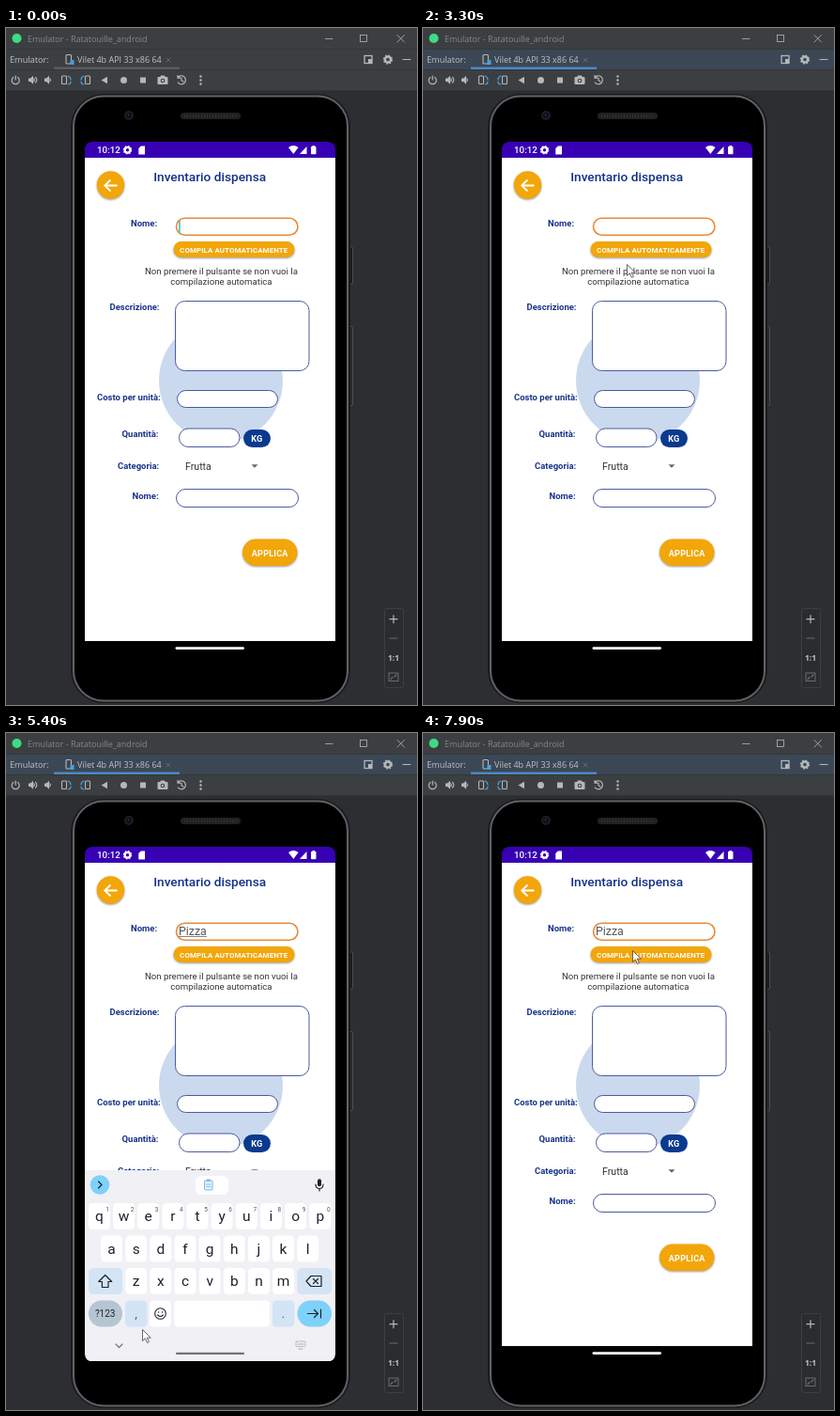
An HTML page for the animation above (8000 ms loop, 438 by 720 pixels).

```html
<!DOCTYPE html>
<html lang="it">
<head>
<meta charset="utf-8">
<title>Inventario dispensa</title>
<style>
html, body { margin: 0; width: 438px; height: 720px; overflow: hidden; background: #2d2e32; }
svg { display: block; }
text { white-space: pre; }
.ide { font: 9px "Open Sans", "Noto Sans", sans-serif; fill: #bfc2c4; }
.app { font-family: Roboto, "Noto Sans", sans-serif; }
.label { font-size: 9.5px; font-weight: 700; fill: #17348a; }
.field { fill: #fff; stroke: #4b5a9e; stroke-width: 1; }
.btn { fill: #f2a609; filter: drop-shadow(0 1.5px 1.2px #0006); }
.cap { fill: #fff; font-weight: 700; text-anchor: middle; }
.ln { fill: none; stroke-width: 1.2; stroke-linecap: round; stroke-linejoin: round; }
.thin { stroke-width: .8; }
</style>
</head>
<body>
<svg id="stage" width="438" height="720" viewBox="0 0 438 720"></svg>
<script>
const LOOP = 8000, STEP = 100;
const GREY = '#b4b8bb', BLUE = '#4a9fe0', INK = '#1d2329';

const rect = (x, y, w, h, r, fill, extra = '') =>
  `<rect x="${x}" y="${y}" width="${w}" height="${h}" rx="${r}" fill="${fill}" ${extra}/>`;
const dot = (x, y, r, fill, extra = '') =>
  `<circle cx="${x}" cy="${y}" r="${r}" fill="${fill}" ${extra}/>`;
const fill = (d, color, extra = '') => `<path d="${d}" fill="${color}" ${extra}/>`;
const line = (d, color, thin = '') => `<path class="ln ${thin}" d="${d}" stroke="${color}"/>`;
const text = (x, y, s, extra = '') => `<text x="${x}" y="${y}" ${extra}>${s}</text>`;
const field = (x, y, w, h, r, extra = '') =>
  `<rect class="field" x="${x}" y="${y}" width="${w}" height="${h}" rx="${r}" ${extra}/>`;
const button = (x, y, w, h) =>
  `<rect class="btn" x="${x}" y="${y}" width="${w}" height="${h}" rx="${h / 2}"/>`;

function gear(x, y, r, color) {
  return dot(x, y, r * .62, 'none', `stroke="${color}" stroke-width="${r * .5}"`) +
    dot(x, y, r * .88, 'none',
      `stroke="${color}" stroke-width="${r * .3}" stroke-dasharray="${r * .345}"`);
}

function speaker(x, waves) {
  let s = fill(`M${x - 4} 53.5h2l3-2.8v9l-3-2.8h-2z`, GREY);
  for (let i = 1; i <= waves; i++)
    s += line(`M${x + i * 1.7} ${55.2 - i * 1.4}q${i * 1.4} ${i * 1.4} 0 ${i * 2.8}`, GREY);
  return s;
}

function rotateIcon(x, side) {
  return rect(x - 2.5 + side * 2, 51, 5, 8.5, 1, 'none', `stroke="${GREY}" stroke-width="1.1"`) +
    line(`M${x - side * 2} 51q${-side * 3} 1 ${-side * 3} 4M${x - side * 2} 60q${-side * 3} 0 ${-side * 3} -3`, BLUE);
}

function ide() {
  return rect(0, 0, 438, 67, 0, '#3c3f41') +
    rect(0, 23, 438, 21, 0, '#3c3f41', 'id="header"') +
    rect(0, 22, 438, 1, 0, '#343739') + rect(0, 44, 438, 1, 0, '#333638') +
    rect(0, 66, 438, 1, 0, '#323436') +
    dot(11.5, 11, 5, '#3ddc84') +
    `<g class="ide">` +
    text(23, 15, 'Emulator - Ratatouille_android', 'fill="#85888b"') +
    text(4, 37, 'Emulator:', 'font-size="9.2"') +
    text(76, 37, 'Vilet 4b API 33 x86 64') + `</g>` +
    line('M340.5 11.5h7.5M417 7.5l7.5 7.5M424.5 7.5l-7.5 7.5', GREY, 'thin') +
    rect(377.5, 7.5, 7, 7, 0, 'none', `stroke="${GREY}" stroke-width=".8"`) +
    rect(64, 28.5, 5.5, 9.5, 1, 'none', `stroke="${GREY}" stroke-width="1.1"`) +
    rect(68.5, 34, 4, 5, .5, BLUE) +
    line('M171 32l4 4M175 32l-4 4', '#6e7275', 'thin') +
    rect(51, 41.5, 134, 2.5, 0, '#595d61', 'id="tab"') +
    rect(382, 29.5, 8, 8, 0, 'none', `stroke="${GREY}" stroke-width="1.3"`) +
    rect(386, 33, 4, 4.5, 0, GREY) +
    gear(407, 33.5, 5, GREY) + line('M423 33.5h8', GREY) +
    line('M7.8 52.5a4 4 0 1 0 4.8 0M10.2 51v4', GREY) +
    speaker(28, 2) + speaker(45, 1) + rotateIcon(64, -1) + rotateIcon(85, 1) +
    fill('M101.5 55.5l6.5-3.7v7.4z', GREY) + dot(125.5, 55.5, 3.5, GREY) +
    rect(143, 52.5, 6, 6, 0, GREY) +
    rect(161.5, 52, 11, 8, 1, GREY) + rect(164.5, 50.5, 5, 3, 1, GREY) +
    dot(167, 56, 2.3, '#3c3f41') + dot(167, 56, 1.2, GREY) +
    line('M183 53a4.5 4.5 0 1 1 .3 5M183 50.5v2.7h2.7M187 53v2.7l2 1.2', GREY) +
    [51.5, 55.5, 59.5].map(y => dot(207.5, y, 1.2, GREY)).join('');
}

function zoomPanel() {
  return rect(403.5, 617.5, 20, 84, 2, '#2b2c2f', 'stroke="#3c3f42"') +
    line('M409 628.7h8M413 624.7v8', GREY) + line('M409 649h8', '#6a6d70') +
    text(413, 673, '1:1', 'class="ide" text-anchor="middle" style="font-size:8.5px;font-weight:700"') +
    rect(408, 686, 10, 8.5, 0, 'none', 'stroke="#6a6d70"') +
    line('M410 692.5l2-2M414 690l2-2', '#6a6d70');
}

function phone() {
  const side = 'stroke="#55575a" stroke-width=".8"';
  return rect(366, 233, 3.5, 39, 1, '#1b1c1e', side) + rect(366, 317.5, 3.5, 84, 1, '#2a2b2d', side) +
    rect(69, 70, 298, 648, 35, '#1a1b1d') +
    rect(72, 72.5, 292, 643, 32, '#000', 'stroke="#606266" stroke-width="2"') +
    dot(131, 93, 5, '#1c1d20') + dot(131, 93, 2.8, '#0b0d19') + dot(130.5, 92.5, 1, '#2d3354') +
    rect(186, 90, 64, 7, 3.5, '#202123') +
    `<path d="M190 93.5h56" stroke="#35363a" stroke-width="2.5" stroke-dasharray="1 2"/>`;
}

function statusBar() {
  return rect(84, 121, 267, 17, 0, '#3700b3') +
    text(97, 133.3, '10:12', 'font-size="9.8" font-weight="500" fill="#fff"') +
    gear(129.5, 129.8, 4.6, '#fff') +
    fill('M141.3 128l2.5-2.5h4.2v9h-6.7z', '#fff') +
    fill('M301 127q5.3-4 10.6 0l-5.3 7z', '#fff') +
    fill('M313 134l7.5-8v8z', '#fff') +
    rect(325, 126, 5.5, 8.3, .8, '#fff') + rect(326.5, 125, 2.5, 2, 0, '#fff');
}

function form() {
  const labels = [[133, 211, 'Nome:'], [110.5, 299.5, 'Descrizione:'], [97, 395.5, 'Costo per unità:'],
    [123.5, 435, 'Quantità:'], [119, 469.3, 'Categoria:'], [134.5, 500.5, 'Nome:']];
  return rect(84, 138, 267, 514, 0, '#fff') +
    dot(229, 375, 66, '#cbd9ee') +
    `<circle class="btn" cx="111.5" cy="167" r="14.7"/>` +
    `<path d="M118.5 167.5h-13M111.5 161.5l-6.3 6 6.3 6" fill="none" stroke="#fff" stroke-width="1.8"/>` +
    text(217.2, 163.3, 'Inventario dispensa', 'text-anchor="middle" font-size="13.7" font-weight="500" fill="#12308a"') +
    labels.map(([x, y, s]) => text(x, y, s, 'class="label"')).join('') +
    field(181.5, 202.2, 129.5, 18, 9, 'style="stroke:#e8893a;stroke-width:1.6"') +
    button(178.5, 227, 129, 17) +
    text(242.7, 238.9, 'COMPILA AUTOMATICAMENTE', 'class="cap" font-size="7.9" letter-spacing=".1"') +
    `<g font-size="9.65" fill="#333" text-anchor="middle">` +
    text(229.4, 262, 'Non premere il pulsante se non vuoi la') +
    text(229.4, 273, 'compilazione automatica') + `</g>` +
    field(180.5, 290.5, 142.5, 74, 10) +
    field(182.5, 385.5, 107, 18, 9) +
    field(184.5, 426, 64.5, 19.5, 9.7) +
    rect(253, 427, 29, 19, 9.5, '#0a3a8f') +
    text(267.3, 440, 'KG', 'class="cap" font-size="9.2"') +
    text(191, 470.2, 'Frutta', 'font-size="10.6" fill="#333"') +
    fill('M261.5 464.3h7l-3.5 3.5z', '#666') +
    field(181.5, 490.5, 130, 19, 9.5) +
    button(252, 543.5, 58.5, 28.5) +
    text(281.2, 561.8, 'APPLICA', 'class="cap" font-size="9.1" letter-spacing=".2"') +
    text(184, 214.7, '', 'id="typed" font-size="12.4" fill="#555"') +
    rect(184, 216, 0, .8, 0, '#666', 'id="under"') +
    rect(184, 205, 1.8, 13, 0, '#5cc3cf', 'id="caret"');
}

function keyRow(keys, x, y, digits) {
  return [...keys].map((k, i) => {
    const cx = x + i * 26.15;
    return rect(cx - 11.5, y, 23, 28, 4.5, '#fff') +
      text(cx, y + 19, k, 'text-anchor="middle" font-size="15.5"') +
      (digits ? text(cx + 9, y + 8.5, (i + 1) % 10, 'text-anchor="middle" font-size="6.5" fill="#555"') : '');
  }).join('');
}

function keyboard() {
  const pale = '#d3e4f5', sky = '#7fd1fa', clip = '#7db8e8';
  return `<g id="keys" fill="${INK}">` + rect(84, 465, 267, 203, 0, '#f0f0f5') +
    dot(100, 480.5, 10.3, sky) + line('M98.5 477l3.5 3.5-3.5 3.5', INK) +
    rect(202, 471, 35, 20, 6, '#fff') +
    rect(211.5, 476, 8.5, 10, 1, '#e3f1fd', `stroke="${clip}"`) +
    rect(213.5, 474.5, 4.5, 2.5, 1, clip) +
    line('M213.5 480h4.5M213.5 482.5h4.5', clip, 'thin') +
    rect(332, 474.3, 4, 8, 2, INK) + line('M330 480q0 4.5 4 4.5t4-4.5M334 484.5v2.5', INK) +
    keyRow('qwertyuiop', 99.4, 500, true) + keyRow('asdfghjkl', 112.5, 534.5) +
    keyRow('zxcvbnm', 138.7, 569) +
    rect(88, 569, 36, 28, 5, pale) + line('M105.7 576.5l-7 7h3.7v6h6.6v-6h3.7z', INK) +
    rect(310.5, 569, 36.5, 28, 5, pale) +
    line('M325 577.5h11v11h-11l-5-5.5zM327.5 580.5l5 5M332.5 580.5l-5 5', INK) +
    rect(88, 603.5, 36, 28, 14, '#b5c5d2') +
    text(105.7, 621.3, '?123', 'text-anchor="middle" font-size="10"') +
    rect(127, 603.5, 23.5, 28, 4.5, pale) + text(138.5, 622, ',', 'text-anchor="middle" font-size="13" fill="#555"') +
    rect(153, 603.5, 23, 28, 4.5, '#fff') +
    dot(164.5, 617.5, 5.8, 'none', `stroke="${INK}" stroke-width="1.1"`) +
    dot(162.5, 616, .8, INK) + dot(166.5, 616, .8, INK) + line('M161.7 619q2.8 3 5.6 0', INK) +
    rect(179, 603.5, 102, 28, 4.5, '#fff') +
    rect(284, 603.5, 23.5, 28, 4.5, pale) + text(295.5, 622, '.', 'text-anchor="middle" font-size="13" fill="#555"') +
    rect(310.5, 603.5, 36.5, 28, 14, sky) +
    line('M321.5 617.5h11M328.5 613.5l4 4-4 4M335.5 613v9', INK) +
    rect(89.5, 636, 62, 32, 14, '#d2d2d6', 'id="ripple"') +
    line('M117 650l3.5 3.5 3.5-3.5', '#77777b') +
    rect(309, 647, 10, 5.5, .5, 'none', 'stroke="#9a9a9e" stroke-width=".9" stroke-dasharray="1.5 .8"') +
    line('M311 650h6M312 655h4', '#9a9a9e', 'thin') +
    rect(181, 658.7, 73, 2.4, 1.2, '#737377', 'id="pill"') + `</g>`;
}

const $ = id => document.getElementById(id);
$('stage').innerHTML =
  `<clipPath id="screen"><rect x="84" y="121" width="267" height="547.5" rx="8"/></clipPath>` +
  ide() + zoomPanel() + phone() +
  `<g class="app" clip-path="url(#screen)">` + statusBar() + form() +
  rect(84, 652, 267, 17, 0, '#000') + rect(180.5, 658.2, 73.5, 2.8, 1.4, '#fff') +
  keyboard() + `</g>` +
  fill('M.5 .5v12l2.9-2.7 2 4.7 2-.9-2-4.5h3.9z', '#fffd', 'id="mouse" stroke="#444" stroke-width=".8" stroke-linejoin="round"');

// time, x, y
const path = [[2000, 440, 520], [2400, 330, 440], [2700, 285, 405], [3200, 217, 251], [4500, 217, 251],
  [5300, 145, 634], [5400, 145, 634], [5800, 126, 651], [6150, 126, 651], [6400, 164, 518],
  [6900, 188, 390], [7700, 223, 231]];
// time, letters shown
const typing = [[0, 0], [3700, 1], [3900, 2], [4100, 3], [4300, 4], [4600, 5]];
// times at which the caret lights up anew
const blinks = [-300, 3700, 3900, 4100, 4300, 4600, 6200];

const clamp = v => Math.min(1, Math.max(0, v));
const smooth = v => v * v * (3 - 2 * v);
const span = (t, a, b) => smooth(clamp((t - a) / (b - a)));
const set = (id, attrs) => { for (const k in attrs) $(id).setAttribute(k, attrs[k]); };

function mouseAt(t) {
  const i = path.findIndex(p => p[0] > t);
  if (i < 0) return path[path.length - 1].slice(1);
  const [a, b] = [path[Math.max(0, i - 1)], path[i]];
  const k = span(t, a[0], b[0]);
  return [a[1] + (b[1] - a[1]) * k, a[2] + (b[2] - a[2]) * k];
}

let shown = -1;
function draw(t) {
  const word = 'Pizza'.slice(0, typing.filter(k => k[0] <= t).pop()[1]);
  if ($('typed').textContent !== word) $('typed').textContent = word;
  const width = word ? $('typed').getComputedTextLength() : 0;
  const since = t - blinks.filter(b => b <= t).pop();
  set('under', { width: t < 6200 ? width : 0 });
  set('caret', { x: 184 + width, opacity: since % 1000 < 500 ? 1 : 0 });

  const up = span(t, 3600, 4000) - span(t, 6400, 6800);
  set('keys', { transform: `translate(0 ${204 * (1 - up)})`, visibility: up > 0 ? 'visible' : 'hidden' });
  set('pill', { opacity: span(t, 4100, 4400) });
  set('ripple', { opacity: t < 6200 ? 0 : 1 - span(t, 6400, 6700) });

  const active = t >= 2400;
  set('header', { fill: active ? '#3b4754' : '#3c3f41' });
  set('tab', { fill: active ? '#4a88c7' : '#595d61' });
  set('mouse', { transform: `translate(${mouseAt(t)})`, visibility: t < 2000 ? 'hidden' : 'visible' });
}

function tick() {
  const t = Math.floor(performance.now() % LOOP / STEP) * STEP;
  if (t !== shown) draw(shown = t);
  requestAnimationFrame(tick);
}
tick();
</script>
</body>
</html>
```
